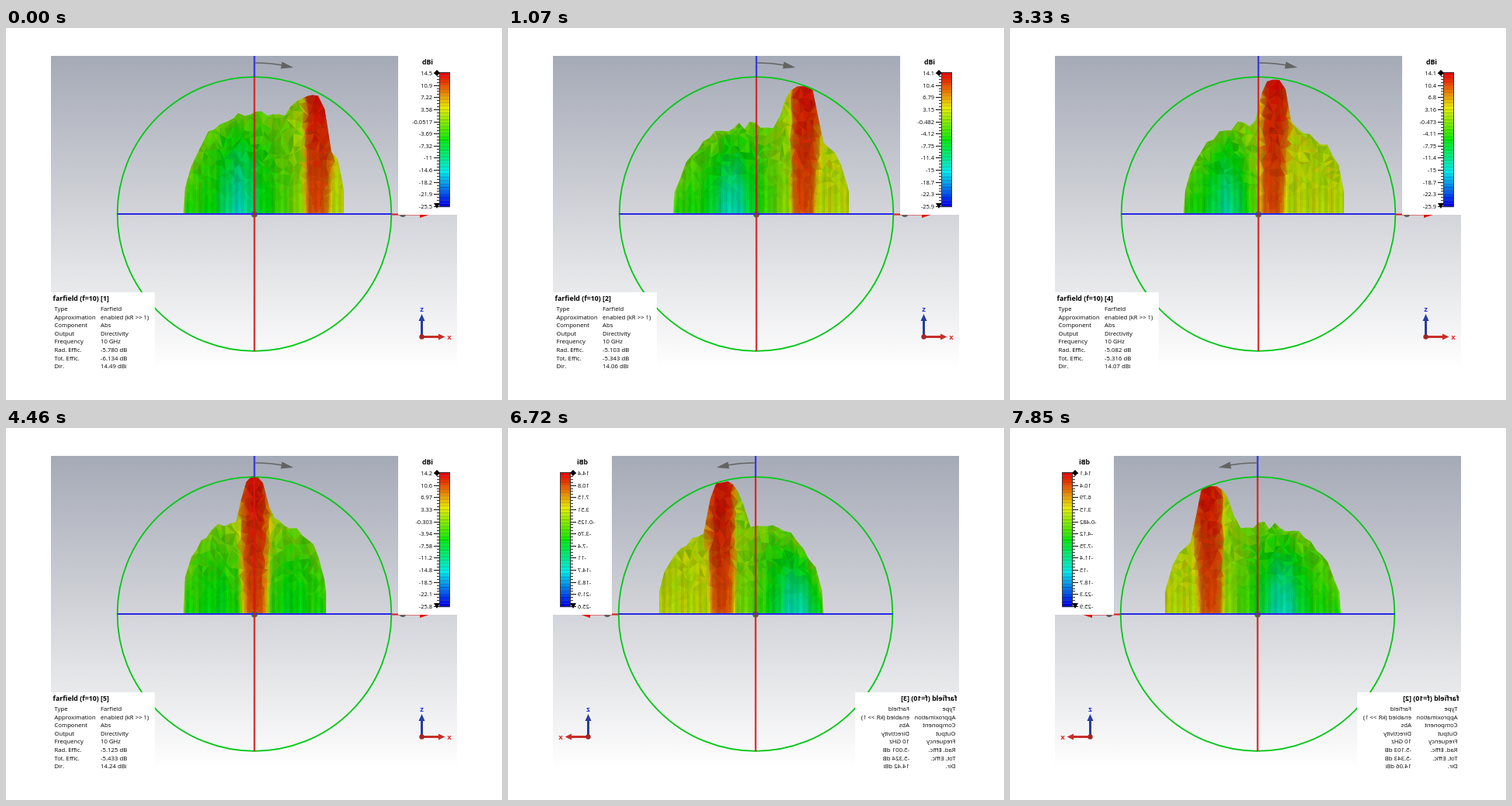
Animation, 640 px wide and 480 px high, one loop 8000 ms. Source, as an HTML page with a canvas:

```html
<!DOCTYPE html>
<html lang="en">
<head>
<meta charset="utf-8">
<title>Farfield sweep</title>
<style>
html, body { margin: 0; width: 100%; height: 100%; overflow: hidden; background: #fff; }
canvas { display: block; }
</style>
</head>
<body>
<canvas id="stage" width="640" height="480"></canvas>
<script>
const ctx = document.getElementById('stage').getContext('2d');
const CX = 320.5, BASE = 240, RADIUS = 176.8;
const FONT = '"Open Sans", "Noto Sans", sans-serif';

// left, right, dome: extent and height of the side lobes
// peak, height, rise, fall: crest of the main lobe and the width of its flanks
// core: middle of the red band; cold, chill: place and strength of the weakest zone
const beams = [
  { max: 14.4938, rad: '-5.780', tot: '-6.134', left: 229, right: 436, dome: 130,
    peak: 403, height: 153, rise: 78, fall: 17, core: 400, cold: 300, chill: .25 },
  { max: 14.0635, rad: '-5.103', tot: '-5.343', left: 213, right: 440, dome: 115,
    peak: 384, height: 166, rise: 53, fall: 26, core: 380, cold: 288, chill: .25 },
  { max: 14.4205, rad: '-5.001', tot: '-5.324', left: 233, right: 445, dome: 114,
    peak: 365, height: 171, rise: 52, fall: 27, core: 363, cold: 268, chill: .25 },
  { max: 14.0725, rad: '-5.082', tot: '-5.316', left: 224, right: 431, dome: 118,
    peak: 343, height: 174, rise: 39, fall: 29, core: 337, cold: 282, chill: .22 },
  { max: 14.2425, rad: '-5.125', tot: '-5.433', left: 229, right: 413, dome: 122,
    peak: 320.5, height: 177, rise: 31, fall: 31, core: 320.5, cold: 285, chill: .12, symmetric: true },
];

const clamp = (v, lo, hi) => Math.min(hi, Math.max(lo, v));
const bell = u => Math.exp(-u * u);

// 0 is the strongest level (red), 1 the weakest (blue), in 40 steps
function levelColor(v, light = 1) {
  const level = Math.round(clamp(v, 0, 1) * 40) / 40;
  return `hsl(${240 * level}, 100%, ${46 * light}%)`;
}

function seeded(seed) {
  return () => (seed = (seed * 16807) % 2147483647) / 2147483647;
}

function shape(points, fill) {
  ctx.beginPath();
  points.forEach(p => ctx.lineTo(...p));
  ctx.closePath();
  if (fill) { ctx.fillStyle = fill; ctx.fill(); }
}

function line(color, width, ...points) {
  ctx.beginPath();
  points.forEach(p => ctx.lineTo(...p));
  ctx.strokeStyle = color;
  ctx.lineWidth = width;
  ctx.stroke();
}

function dot(x, y, r, color) {
  ctx.beginPath();
  ctx.arc(x, y, r, 0, 7);
  ctx.fillStyle = color;
  ctx.fill();
}

function rect(x, y, w, h, fill) {
  ctx.fillStyle = fill;
  ctx.fillRect(x, y, w, h);
}

function text(str, x, y, size, { bold = false, align = 'left', color = '#000' } = {}) {
  ctx.font = `${bold ? 'bold ' : ''}${size}px ${FONT}`;
  ctx.textAlign = align;
  ctx.fillStyle = color;
  ctx.fillText(str, x, y);
}

function drawBackdrop() {
  const g = ctx.createLinearGradient(0, 36, 0, 441);
  g.addColorStop(0, '#a5aab7');
  g.addColorStop(.5, '#d3d4d9');
  g.addColorStop(1, '#ffffff');
  rect(58, 36, 524, 405, g);
  line('#e61414', 2, [498, 240.5], [540, 240.5]);
  dot(512, 240, 4, '#606060');
  shape([[534, 236], [547, 240.5], [534, 245]], '#e01010');
  rect(506, 36, 76, 205, '#fff');
}

// Height of the silhouette: a rounded dome with the main lobe standing out of it.
function domeAt(b, x) {
  const onLeft = x < CX;
  const u = clamp((x - CX) / ((onLeft ? b.left : b.right) - CX), 0, 1);
  return b.dome * (1 - u ** 2.3) ** (onLeft && !b.symmetric ? .5 : .35);
}

function lobeAt(b, x) {
  const u = Math.abs(x - b.peak) / (x < b.peak ? b.rise : b.fall);
  return b.height * (1 - u ** 3);
}

const heightAt = (b, x) => Math.max(domeAt(b, x), lobeAt(b, x), 1);

function levelAt(b, x, y) {
  const t = clamp((BASE - y) / heightAt(b, x), 0, 1);
  const side = b.symmetric ? -Math.abs(x - CX) : x - b.core;
  const away = clamp(-side / 60, 0, 1);
  const cold = b.symmetric ? CX + side : x;
  const body = .29 + away * .17 * (1 - .5 * t * t)
    + b.chill * bell((cold - b.cold) / 27) * (1 - t ** 1.5)
    + .02 * Math.sin(x * .3) * (1 - t);
  const center = b.core + (b.peak - b.core) * t;
  const d = Math.abs(x - center) / (14 + 3 * t);
  const lobe = .09 - .07 * t + .06 * Math.min(d, 1.5) ** 3;
  const weight = Math.exp(-((d / 1.25) ** 6));
  return body + (lobe - body) * weight;
}

function drawSurface(b, seed) {
  const random = seeded(seed);
  const jitter = amount => (random() - .5) * amount;

  const outline = [[b.left, BASE]];
  for (let x = b.left + 2; x < b.right; x += 6 + random() * 3) {
    const rough = lobeAt(b, x) > domeAt(b, x) ? 3 : 10;
    outline.push([x, BASE - heightAt(b, x) + jitter(rough)]);
  }
  outline.push([b.right, BASE - 28], [b.right, BASE]);
  ctx.save();
  shape(outline);
  ctx.clip();

  // contour bands with fine vertical ribs
  for (let x = b.left; x < b.right; x += 2) {
    const light = .87 + .05 * Math.sin(x * .8) + .04 * Math.sin(x * .27);
    for (let y = BASE - 3; y > 54; y -= 3) rect(x, y, 2, 3, levelColor(levelAt(b, x, y), light));
  }

  // irregular facets, fading towards the ground plane
  const grid = [];
  for (let y = BASE; y > 46; y -= 10) {
    const row = [];
    for (let x = b.left - 8; x < b.right + 16; x += 8) row.push([x + jitter(8), y + jitter(9)]);
    grid.push(row);
  }
  const facet = (...corners) => {
    const [x, y] = [0, 1].map(n => corners.reduce((sum, p) => sum + p[n], 0) / 3);
    const level = levelAt(b, x, y);
    const rough = clamp((BASE - y) / 70, 0, 1);
    ctx.globalAlpha = .7 * rough;
    shape(corners, levelColor(level + jitter(level < .2 ? .03 : .09), .9 - random() * .22));
  };
  for (let r = 1; r < grid.length; r++) {
    for (let c = 1; c < grid[r].length; c++) {
      const p = grid[r - 1][c - 1], q = grid[r - 1][c], s = grid[r][c - 1], t = grid[r][c];
      if (random() < .5) { facet(p, q, s); facet(q, t, s); }
      else { facet(p, q, t); facet(p, t, s); }
    }
  }
  ctx.restore();
}

function drawAxes() {
  ctx.beginPath();
  ctx.arc(CX, BASE, RADIUS, 0, 7);
  ctx.strokeStyle = '#00c814';
  ctx.lineWidth = 1.8;
  ctx.stroke();
  dot(CX, 240.5, 4, '#328250');
  line('#2828e6', 2, [143.5, BASE], [497.5, BASE]);
  line('#2828e6', 2, [CX, 36], [CX, 63]);
  line('#dc1414', 2, [CX, 63], [CX, 417]);

  ctx.beginPath();
  ctx.moveTo(321, 45);
  ctx.quadraticCurveTo(340, 45, 357, 48);
  ctx.strokeStyle = '#646464';
  ctx.lineWidth = 1.5;
  ctx.stroke();
  shape([[356, 43.5], [371, 51], [354.5, 52.5]], '#646464');
}

function drawLegend(max) {
  text('dBi', 544, 47, 8.75, { bold: true, align: 'center' });
  for (let i = 0; i < 40; i++) {
    const y = 57 + i * 4.35;
    rect(559, y, 14, 4.5, levelColor(i / 39));
    rect(559, y, 14, .7, 'rgba(0, 0, 0, .25)');
  }
  ctx.strokeStyle = '#333';
  ctx.lineWidth = 1;
  ctx.strokeRect(559.5, 57.5, 13, 173);
  for (let i = 0; i < 12; i++) {
    const y = 58 + i * 15.64;
    const mark = Math.round(y) + .5;
    line('#111', 1, [552, mark], [559, mark]);
    for (let j = 1; j < 4 && i < 11; j++) {
      const minor = Math.round(y + j * 3.91) + .5;
      line('#333', 1, [556, minor], [559, minor]);
    }
    text(String(Number((max - i * 40 / 11).toPrecision(3))), 550, y + 3, 7.5, { align: 'right' });
  }
  shape([[552, 58], [556, 54], [560, 58], [556, 62]], '#000');
  shape([[552, 226], [560, 226], [556, 233]], '#000');
}

function drawInfo({ max, rad, tot }, number) {
  rect(58, 341, 134, 100, '#fff');
  text(`farfield (f=10) [${number}]`, 60.5, 352, 8.85, { bold: true });
  const rows = [['Type', 'Farfield'], ['Approximation', 'enabled (kR >> 1)'], ['Component', 'Abs'],
    ['Output', 'Directivity'], ['Frequency', '10 GHz'], ['Rad. Effic.', `${rad} dB`],
    ['Tot. Effic.', `${tot} dB`], ['Dir.', `${max.toFixed(2)} dBi`]];
  rows.forEach(([label, value], i) => {
    const y = 365 + i * 10.6;
    text(label, 62.5, y, 7.7);
    text(value, 122, y, 7.8);
  });
}

function drawTriad() {
  const blue = '#283ca0', red = '#c82d28';
  line(blue, 3, [536.5, 398], [536.5, 376]);
  shape([[532.5, 378], [536.5, 369], [540.5, 378]], blue);
  line(red, 3, [537, 398.5], [559, 398.5]);
  shape([[558, 394.5], [566.5, 398.5], [558, 402.5]], red);
  dot(536.5, 398.5, 3.2, '#a02828');
  text('z', 536.5, 366, 9.5, { bold: true, align: 'center', color: '#2832dc' });
  text('x', 572, 402, 9.5, { bold: true, align: 'center', color: '#e62828' });
}

function drawScene(index, flipped) {
  ctx.setTransform(1, 0, 0, 1, 0, 0);
  rect(0, 0, 640, 480, '#fff');
  if (flipped) ctx.setTransform(-1, 0, 0, 1, 640, 0);
  const beam = beams[index];
  drawBackdrop();
  drawSurface(beam, 4711 + index * 977);
  drawAxes();
  drawLegend(beam.max);
  drawInfo(beam, index + 1);
  drawTriad();
}

// The beam sweeps to broadside, then back again as a mirror image.
const LOOP = 8000, FIRST = 1070, STEP = 1130, LAST = beams.length - 1;
const start = performance.now();
let shown = -1;

function tick() {
  const t = (performance.now() - start) % LOOP;
  const step = t < FIRST ? 0 : 1 + Math.floor((t - FIRST) / STEP);
  if (step !== shown) {
    shown = step;
    drawScene(LAST - Math.abs(LAST - step), step > LAST);
  }
  requestAnimationFrame(tick);
}
tick();
</script>
</body>
</html>
```
